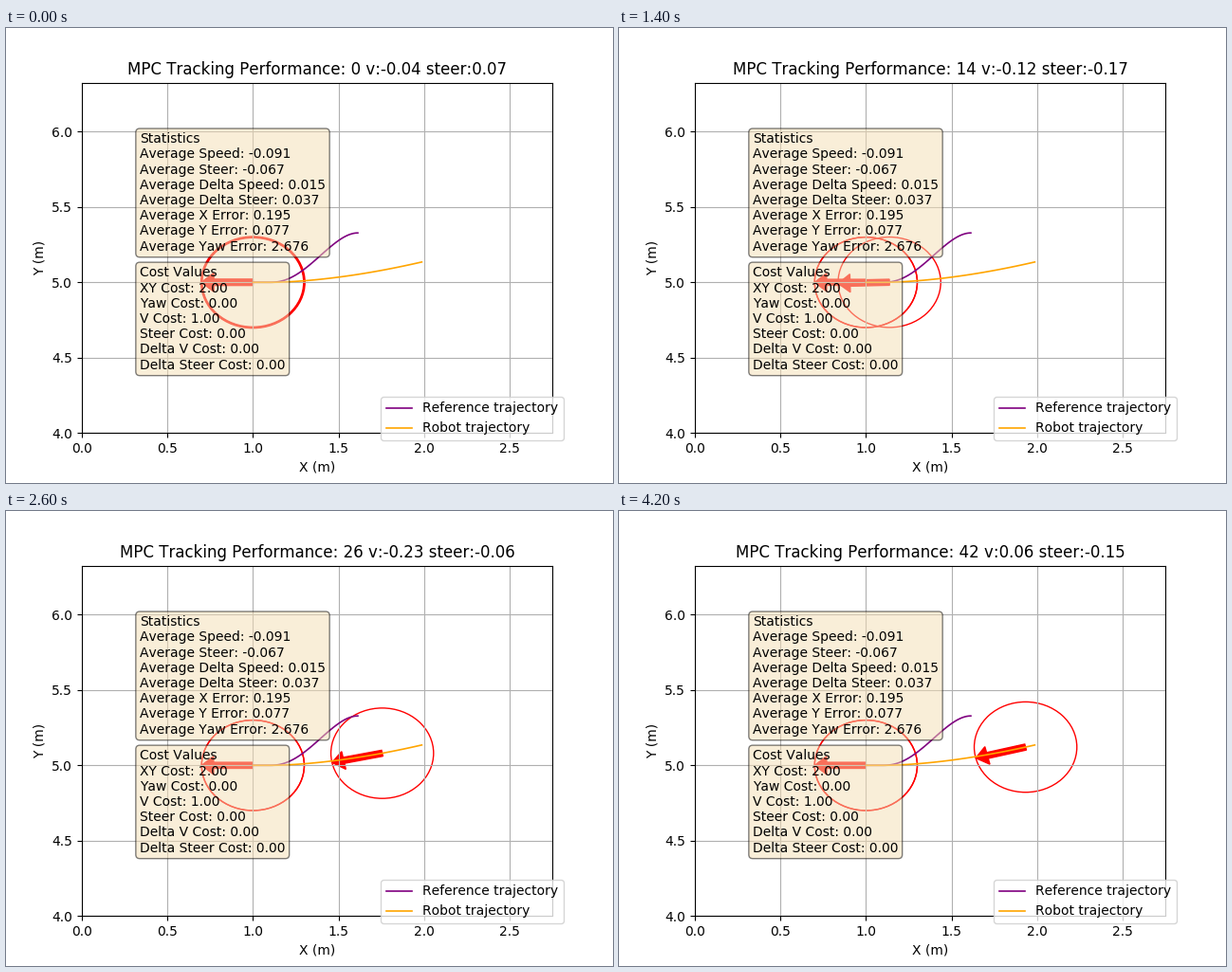
Recreate the animation shown at these times as a matplotlib script. Size 640 px wide and 480 px high, loop 4.3 s.

```python
import numpy as np
import matplotlib.pyplot as plt
from matplotlib.animation import FuncAnimation
from matplotlib.patches import Circle, FancyArrow

FRAMES, STEP_MS = 43, 100
DT = 0.2275
RADIUS = 0.3
BEND, PATH_END, RISE, POWER = 1.1, 1.987, 0.135, 1.72
REF_END, REF_RISE = 1.613, 0.328

# Key poses: step, speed, steer
KEYS = np.array([(0, -0.04, 0.07), (10, -0.04, -0.05), (18, -0.21, -0.24),
                 (22, -0.28, -0.13), (26, -0.23, -0.06), (29, -0.12, -0.05),
                 (32, -0.07, -0.05), (38, 0.02, -0.16), (42, 0.06, -0.15)])


def smooth(x, xs, ys):
    """Cubic Hermite curve through the key points."""
    slope = np.gradient(ys, xs)
    i = np.clip(np.searchsorted(xs, x, side="right") - 1, 0, len(xs) - 2)
    h = xs[i + 1] - xs[i]
    t = (x - xs[i]) / h
    return ((1 + 2 * t) * (1 - t) ** 2 * ys[i] + t * (1 - t) ** 2 * h * slope[i]
            + t * t * (3 - 2 * t) * ys[i + 1] + t * t * (t - 1) * h * slope[i + 1])


def along(x, end):
    """Progress from the bend to the end of a trajectory."""
    return np.clip((x - BEND) / (end - BEND), 0, None)


def path_y(x):
    return 5 + RISE * along(x, PATH_END) ** POWER


def path_angle(x):
    slope = POWER * RISE / (PATH_END - BEND) * along(x, PATH_END) ** (POWER - 1)
    return np.arctan(slope)


def reference_y(x):
    w = along(x, REF_END) ** 1.15
    return 5 + REF_RISE * w * w * (3 - 2 * w)


# Drive the robot backwards along its path
step = np.arange(FRAMES)
speed = smooth(step, KEYS[:, 0], KEYS[:, 1])
steer = smooth(step, KEYS[:, 0], KEYS[:, 2])
travel = np.cumsum((speed[1:] + speed[:-1]) / 2) * DT
pos_x = 1 - np.concatenate(([0], travel))
pos_y = path_y(pos_x)
yaw = np.pi + path_angle(pos_x)

STATS = """Statistics
Average Speed: -0.091
Average Steer: -0.067
Average Delta Speed: 0.015
Average Delta Steer: 0.037
Average X Error: 0.195
Average Y Error: 0.077
Average Yaw Error: 2.676"""

COSTS = """Cost Values
XY Cost: 2.00
Yaw Cost: 0.00
V Cost: 1.00
Steer Cost: 0.00
Delta V Cost: 0.00
Delta Steer Cost: 0.00"""

plt.rcParams["text.kerning_factor"] = 6
plt.rcParams["lines.linewidth"] = 1.2
fig, ax = plt.subplots(figsize=(6.4, 4.8), dpi=100)
ax.set(xlim=(0, 2.75), ylim=(4, 6.326), xlabel="X (m)", ylabel="Y (m)",
       xticks=np.arange(0, 2.6, 0.5), yticks=np.arange(4, 6.1, 0.5))
ax.grid(True)


def add_circle():
    return ax.add_patch(Circle((1, 5), RADIUS, fill=False, color="red"))


def add_arrow():
    return ax.add_patch(FancyArrow(1, 5, -RADIUS, 0, width=0.04,
                                   head_width=0.12, head_length=0.07,
                                   length_includes_head=True, color="red"))


def add_note(y, text):
    ax.text(0.123, y, text, transform=ax.transAxes, fontsize=10, va="top",
            bbox=dict(boxstyle="round", facecolor="wheat", alpha=0.5))


def add_trajectory(name, end, curve, color):
    x = np.linspace(1, end, 80)
    ax.plot(x, curve(x), color=color, label=f"{name} trajectory")


# The start pose is stroked twice, which makes its outline heavier
for _ in range(2):
    add_circle()
add_arrow()
body, heading = add_circle(), add_arrow()

add_trajectory("Reference", REF_END, reference_y, "purple")
add_trajectory("Robot", PATH_END, path_y, "orange")
add_note(0.8577, STATS)
add_note(0.4759, COSTS)
ax.legend(loc="lower left", bbox_to_anchor=(0.635, -0.021), borderaxespad=0)
title = ax.set_title("")


def update(i):
    x, y = pos_x[i], pos_y[i]
    body.center = x, y
    body.set_linewidth(1 if i else 2)  # heavy outline while at the start
    heading.set_data(x=x, y=y, dx=RADIUS * np.cos(yaw[i]),
                     dy=RADIUS * np.sin(yaw[i]))
    title.set_text(f"MPC Tracking Performance: {i} "
                   f"v:{speed[i]:.2f} steer:{steer[i]:.2f}")
    return body, heading, title


anim = FuncAnimation(fig, update, frames=FRAMES, interval=STEP_MS, repeat=True)
plt.show()
```
